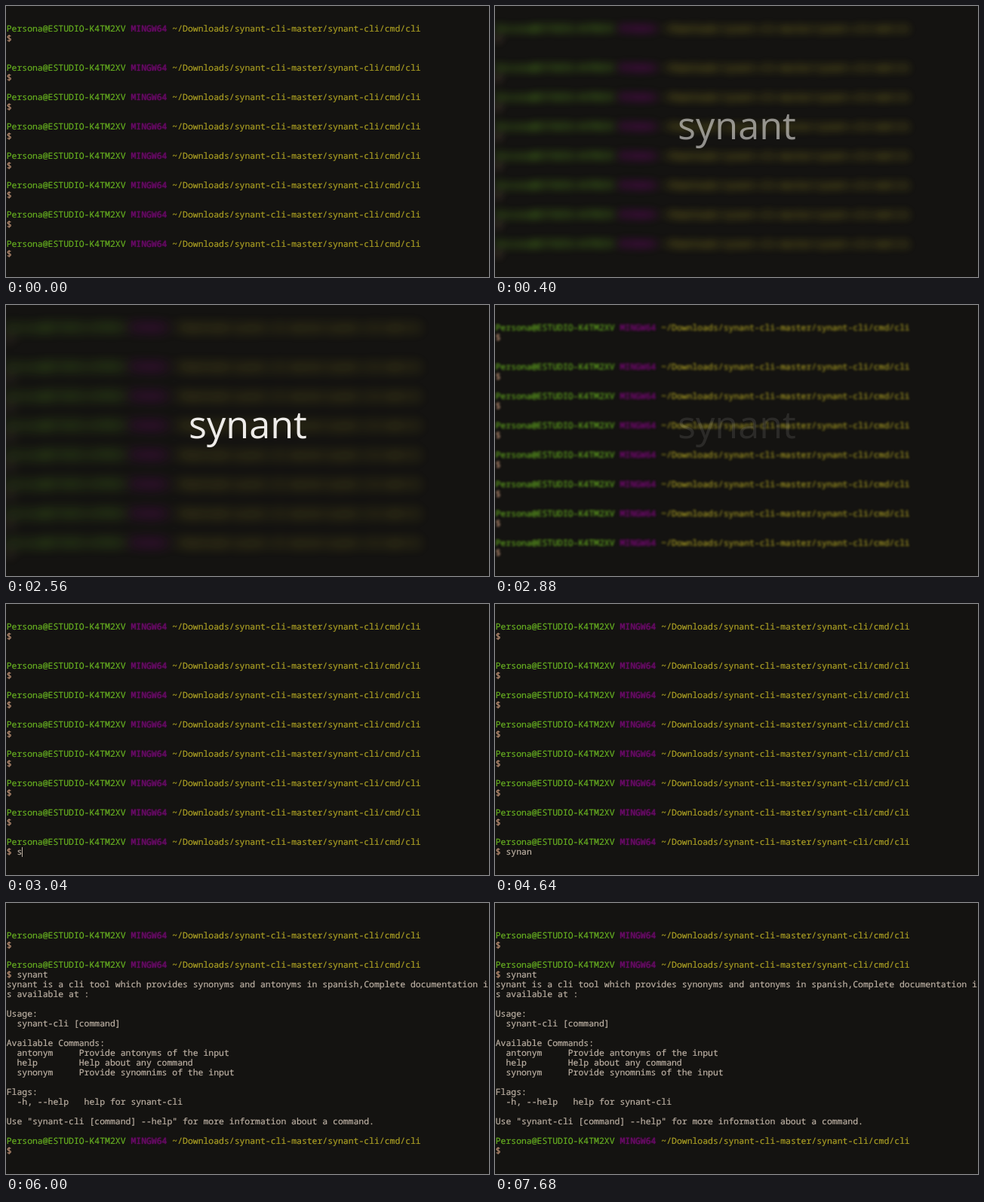
An HTML page for the animation above (8 s loop, 640x360 px).

```html
<!DOCTYPE html>
<html lang="en">
<head>
<meta charset="utf-8">
<title>synant</title>
<style>
  html, body { margin: 0; width: 100%; height: 100%; overflow: hidden; background: #141311; }
  #stage {
    --col: 6.87px;
    position: relative; width: 640px; height: 360px; overflow: hidden;
    background: #141311; color: #bdb1a4;
    font: 11.45px/13px "Noto Sans Mono", "DejaVu Sans Mono", monospace;
    text-rendering: geometricPrecision;
  }
  #term {
    position: absolute; inset: 0; -webkit-text-stroke: .2px;
    animation: defocus 8s linear infinite;
  }
  .screen { position: absolute; inset: 0; animation: 8s step-end infinite; }
  #before { animation-name: leave; }
  #after { animation-name: enter; }
  pre { position: absolute; left: .7px; top: 24px; margin: 0; font: inherit; }
  .user { color: #67b021; }
  .env { color: #6c0b6a; text-shadow: 0 0 2px #6c0b6a; }
  .path { color: #aca024; }
  .sign { color: #c6977a; }

  .input {
    position: absolute; left: calc(2 * var(--col) + .7px); top: 323px; height: 13px;
    line-height: 13px; white-space: pre; overflow: hidden;
    width: 0; border-right: 1.5px solid transparent;
    animation: 8s step-end infinite;
  }
  #before .input { animation-name: type, blink-typing; }
  #after .input { animation-name: blink-idle; }

  #title {
    position: absolute; left: 242px; top: 132.5px;
    font: 50.3px/50px "Open Sans", "Noto Sans", sans-serif; color: #efedea;
    animation: title 8s linear infinite;
  }

  /* 1% = 80 ms */
  @keyframes defocus {
    0%, 37%, 100% { filter: blur(.3px); opacity: 1; }
    7%, 32% { filter: blur(8px); opacity: .85; }
  }
  @keyframes title {
    0%, 1%, 36.5%, 100% { opacity: 0; }
    8%, 32% { opacity: 1; }
  }
  @keyframes leave { 0% { visibility: visible; } 68%, 100% { visibility: hidden; } }
  @keyframes enter { 0% { visibility: hidden; } 68%, 100% { visibility: visible; } }
  @keyframes type {
    0% { width: 0; }
    37.5% { width: var(--col); }
    43% { width: calc(2 * var(--col)); }
    45% { width: calc(3 * var(--col)); }
    47.5% { width: calc(4 * var(--col)); }
    50% { width: calc(5 * var(--col)); }
    59%, 100% { width: calc(6 * var(--col)); }
  }
  @keyframes blink-typing {
    0%, 56%, 65%, 100% { border-color: transparent; }
    37%, 59% { border-color: #bdb1a4; }
  }
  @keyframes blink-idle {
    0%, 74.6%, 85.3%, 96%, 100% { border-color: transparent; }
    68%, 80%, 90.6% { border-color: #bdb1a4; }
  }
</style>
</head>
<body>
<div id="stage">
  <div id="term">
    <div id="before" class="screen"><pre></pre><div class="input">synant</div></div>
    <div id="after" class="screen"><pre></pre><div class="input"></div></div>
  </div>
  <div id="title">synant</div>
</div>
<script>
  const span = (name, text) => `<span class="${name}">${text}</span>`;

  const prompt = (command = "") =>
    span("user", "Persona@ESTUDIO-K4TM2XV") + " " +
    span("env", "MINGW64") + " " +
    span("path", "~/Downloads/synant-cli-master/synant-cli/cmd/cli") + "\n" +
    span("sign", "$") + " " + command + "\n";

  const help = `synant is a cli tool which provides synonyms and antonyms in spanish,Complete documentation i
s available at :

Usage:
  synant-cli [command]

Available Commands:
  antonym     Provide antonyms of the input
  help        Help about any command
  synonym     Provide synomnims of the input

Flags:
  -h, --help   help for synant-cli

Use "synant-cli [command] --help" for more information about a command.

`;

  const fill = (id, html) => {
    document.querySelector(`#${id} pre`).innerHTML = html;
  };

  fill("before", prompt() + "\n\n" + Array(7).fill(prompt()).join("\n"));
  fill("after", " \n" + prompt() + "\n" + prompt("synant") + help + prompt());
</script>
</body>
</html>
```
